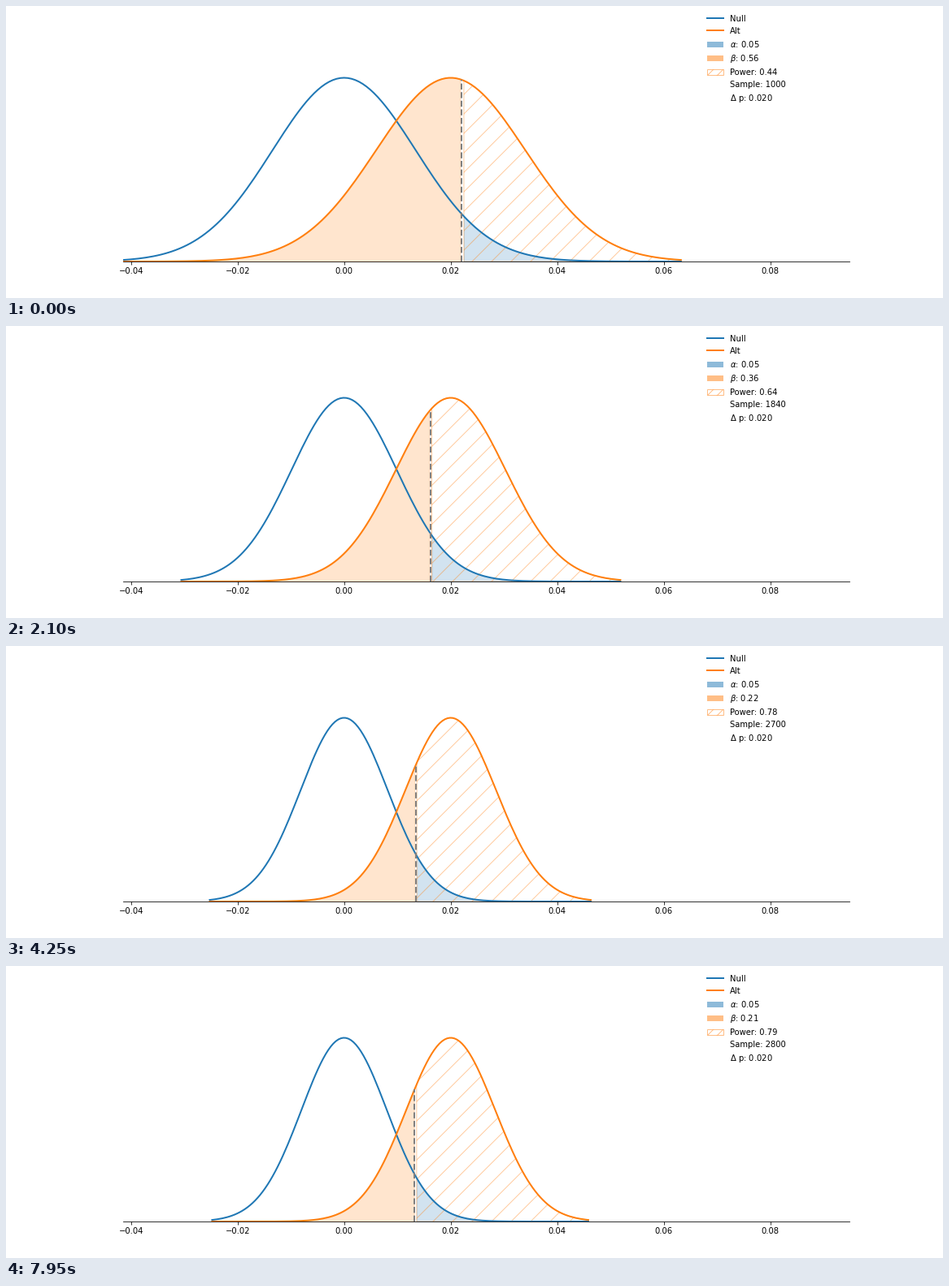
Animation of 1152 by 360 pixels, one loop 8 s. Source, as a matplotlib script:

```python
import math

import matplotlib.pyplot as plt
import numpy as np
from matplotlib.animation import FuncAnimation
from matplotlib.lines import Line2D
from matplotlib.patches import Patch

FRAMES, INTERVAL = 160, 50
P_NULL, DELTA = 0.10, 0.02
Z_CRIT, Z_TAIL = 1.645, 3.09
BLUE, ORANGE = "tab:blue", "tab:orange"

plt.rcParams.update({"font.family": "DejaVu Sans", "font.size": 10})

fig = plt.figure(figsize=(16, 5), dpi=72, facecolor="white")
ax = fig.add_axes([0.125, 0.125, 0.775, 0.755])
ax.set(xlim=(-0.04147, 0.0948), ylim=(0, 1.2))
ax.yaxis.set_visible(False)
for side in ("left", "right", "top"):
    ax.spines[side].set_visible(False)

null_line, = ax.plot([], [], color=BLUE, lw=2)
alt_line, = ax.plot([], [], color=ORANGE, lw=2)
crit_line, = ax.plot([], [], color="gray", lw=2, ls="--")

legend = ax.legend(
    [
        Line2D([], [], color=BLUE, lw=2),
        Line2D([], [], color=ORANGE, lw=2),
        Patch(color=BLUE, alpha=0.5, lw=0),
        Patch(color=ORANGE, alpha=0.5, lw=0),
        Patch(facecolor="none", edgecolor=ORANGE, alpha=0.5, hatch="//"),
        Patch(alpha=0),
        Patch(alpha=0),
    ],
    ["Null", "Alt", r"$\alpha$: 0.05", r"$\beta$: 0.56", "Power: 0.44",
     "Sample: 1000", rf"$\Delta$ p: {DELTA:.3f}"],
    loc=(0.8, 0.7), frameon=False, fontsize=10,
)
beta_text, power_text, sample_text = legend.get_texts()[3:6]
fills = []


def sample_size(i):
    """Grow by 20 per step, hold at the top, then shrink again."""
    return 1000 + 20 * min(i, 99) - 20 * max(i - 150, 0)


def bell(x, mean, sd):
    return np.exp(-0.5 * ((x - mean) / sd) ** 2)


def norm_cdf(z):
    return 0.5 * (1 + math.erf(z / math.sqrt(2)))


def update(i):
    n = sample_size(i)
    p_alt = P_NULL + DELTA
    var_null, var_alt = P_NULL * (1 - P_NULL), p_alt * (1 - p_alt)
    sd_null = math.sqrt(2 * var_null / n)
    sd_alt = math.sqrt((var_null + var_alt) / n)
    crit = Z_CRIT * sd_null
    beta = norm_cdf((crit - DELTA) / sd_alt)

    x = np.linspace(-Z_TAIL * sd_null, DELTA + Z_TAIL * sd_alt, 150)
    null, alt = bell(x, 0, sd_null), bell(x, DELTA, sd_alt)
    null_line.set_data(x, null)
    alt_line.set_data(x, alt)
    crit_line.set_data([crit, crit], [0, bell(crit, DELTA, sd_alt)])

    while fills:
        fills.pop().remove()
    right = x >= crit
    fills.extend([
        ax.fill_between(x, null, where=right, color=BLUE, alpha=0.2),
        ax.fill_between(x, alt, where=~right, color=ORANGE, alpha=0.2),
        ax.fill_between(x, alt, where=right, facecolor="none",
                        edgecolor=ORANGE, alpha=0.4, hatch="/"),
    ])

    beta_text.set_text(rf"$\beta$: {beta:.2f}")
    power_text.set_text(f"Power: {1 - beta:.2f}")
    sample_text.set_text(f"Sample: {n}")
    return [null_line, alt_line, crit_line, *fills]


anim = FuncAnimation(fig, update, frames=FRAMES, interval=INTERVAL,
                     init_func=lambda: update(0), repeat=True,
                     repeat_delay=0, blit=False)
plt.show()
```
